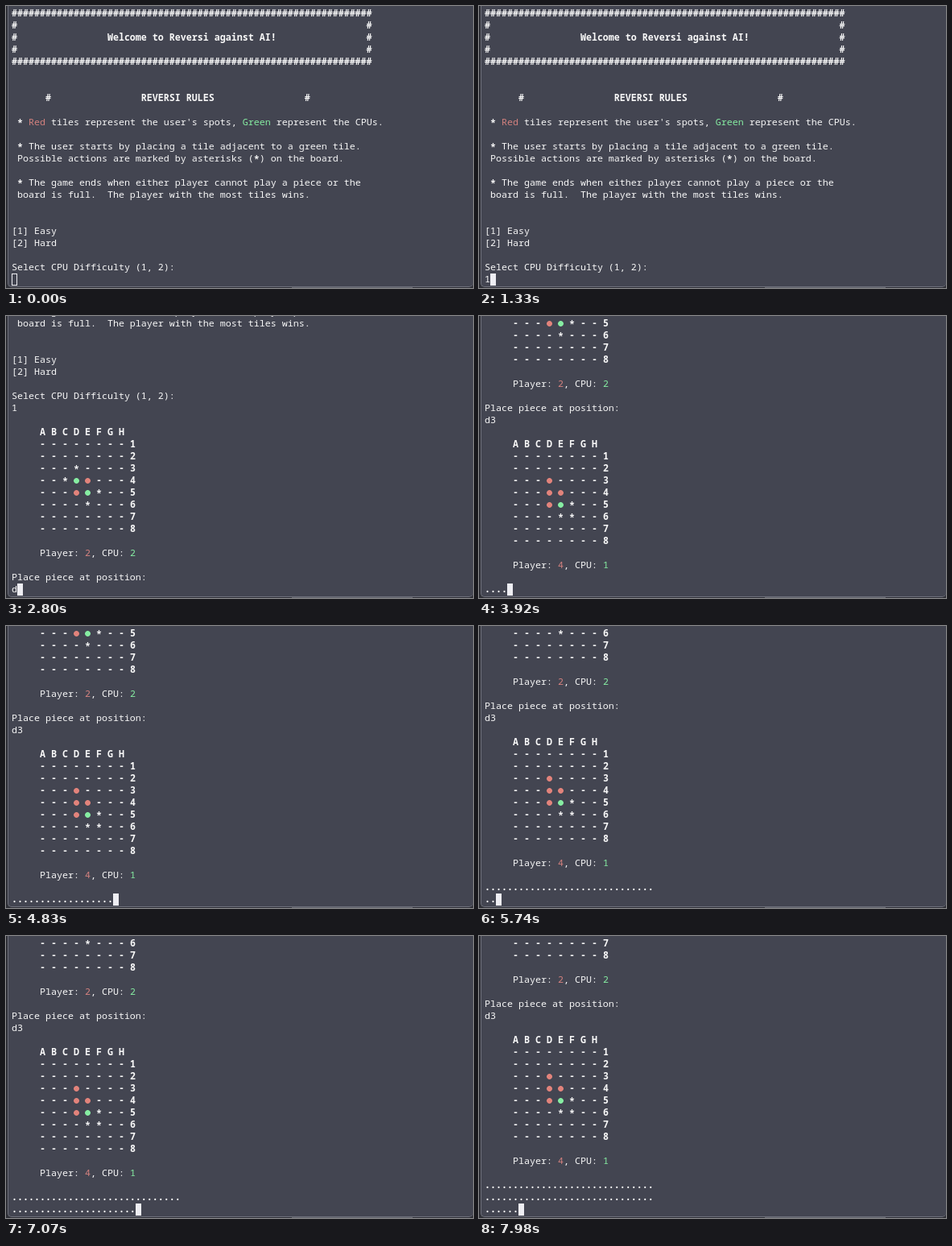
Recreate the animation shown at these times as an HTML page. Size 580 px wide and 350 px high, loop 8000 ms.

```html
<!DOCTYPE html>
<html lang="en">
<head>
<meta charset="utf-8">
<title>Reversi in a terminal</title>
<style>
  html, body { margin: 0; width: 100%; height: 100%; overflow: hidden; background: #2e2f36; }
  #stage { position: relative; width: 580px; height: 350px; overflow: hidden; }
  #window {
    position: absolute; left: 2px; top: -10px; width: 577px; height: 358px;
    background: #434551; border: solid #70727d; border-width: 0 0 1px 1px;
    border-radius: 0 0 5px 5px;
  }
  #shade { position: absolute; left: 355px; top: 349px; width: 150px; height: 1px; background: #62636b; }
  #text {
    position: absolute; left: 7px; bottom: 4px; margin: 0; color: #f8f8f8;
    font: 500 11.667px/15px "Noto Sans Mono", "DejaVu Sans Mono", monospace;
    font-variant-ligatures: none; white-space: pre;
  }
  #text div { height: 15px; }
  b { font-weight: 600; }
  .r { color: #d5827f; }
  .g { color: #86eda2; }
  .disc {
    display: inline-block; width: 7px; height: 15px; vertical-align: top;
    background: radial-gradient(circle at 3.5px 8.5px, currentColor 3px, transparent 3.8px);
  }
  .disc.r { color: #e2837b; }
  .star { position: relative; top: 2px; font-weight: 800; }
  .dots { font-weight: 800; }
  #cursor { position: absolute; top: 332px; width: 7px; height: 15px; box-sizing: border-box; border: 1px solid #eeeef3; }
  #cursor.focused { background: #eeeef3; }
</style>
</head>
<body>
<div id="stage">
  <div id="window"></div>
  <div id="shade"></div>
  <div id="text"></div>
  <div id="cursor"></div>
</div>
<script>
const LOOP = 8000, TICK = 70, CELL = 7, ROWS = 23;
const AT = { focus: 70, one: 1050, start: 1680, d: 2660, three: 3010, move: 3710 };
const DOT_MS = 65.4, DOTS_PER_LINE = 30;

const bold = s => `<b>${s}</b>`;
const span = (name, s) => `<span class="${name}">${s}</span>`;
const red = s => span('r', s);
const green = s => span('g', s);
const dotted = n => span('dots', '.'.repeat(n));

const bar = bold('#'.repeat(64));
const side = bold('#' + ' '.repeat(62) + '#');
const title = 'Welcome to Reversi against AI!';

const intro = [
  bar, side,
  bold('#' + ' '.repeat(16) + title + ' '.repeat(16) + '#'),
  side, bar, '', '',
  bold(' '.repeat(6) + '#' + ' '.repeat(16) + 'REVERSI RULES' + ' '.repeat(16) + '#'),
  '',
  ` * ${red('Red')} tiles represent the user's spots, ${green('Green')} represent the CPUs.`,
  '',
  ' * The user starts by placing a tile adjacent to a green tile.',
  ' Possible actions are marked by asterisks (*) on the board.',
  '',
  ' * The game ends when either player cannot play a piece or the',
  ' board is full.  The player with the most tiles wins.',
  '', '',
  '[1] Easy',
  '[2] Hard',
  '',
  'Select CPU Difficulty (1, 2):'
];

const cell = c => c === 'r' || c === 'g' ? span('disc ' + c, '') : c;

// Ranks 3 to 6 are given; the others are empty.
function board(middle, player, cpu) {
  const empty = '--------';
  const ranks = [empty, empty, ...middle, empty, empty];
  const pad = ' '.repeat(5);
  return [
    '',
    pad + bold('A B C D E F G H'),
    ...ranks.map((rank, i) => pad + bold([...rank].map(cell).join(' ') + ' ' + (i + 1))),
    '',
    `${pad}Player: ${red(player)}, CPU: ${green(cpu)}`,
    ''
  ];
}

const opening = [...intro, '1',
  ...board(['---*----', '--*gr---', '---rg*--', '----*---'], 2, 2),
  'Place piece at position:'];
const thinking = [...opening, 'd3',
  ...board(['---r----', '---rr---', '---rg*--', '----**--'], 4, 1)];

// Returns the lines on screen and the cursor's column in the last one.
function screen(t) {
  if (t < AT.move) {
    const started = t >= AT.start;
    const typed = started
      ? (t < AT.d ? '' : t < AT.three ? 'd' : 'd3')
      : (t < AT.one ? '' : '1');
    return [[...(started ? opening : intro), typed], typed.length];
  }
  const dots = 1 + Math.floor((t - AT.move) / DOT_MS);
  const full = Math.floor(dots / DOTS_PER_LINE);
  const rest = dots % DOTS_PER_LINE;
  return [[...thinking, ...Array(full).fill(dotted(DOTS_PER_LINE)), dotted(rest)], rest];
}

const text = document.getElementById('text');
const cursor = document.getElementById('cursor');
const begin = performance.now();
let shown = -1;

// Asterisks sit at the middle of the line.
const row = s => `<div>${s.replaceAll('*', span('star', '*'))}</div>`;

function draw(now) {
  const t = Math.floor((Math.max(0, now - begin) % LOOP) / TICK) * TICK;
  if (t !== shown) {
    shown = t;
    const [lines, column] = screen(t);
    // One extra line lets descenders show at the top edge.
    text.innerHTML = lines.slice(-ROWS - 1).map(row).join('');
    cursor.style.left = 7 + column * CELL + 'px';
    cursor.className = t < AT.focus ? '' : 'focused';
  }
  requestAnimationFrame(draw);
}
draw(begin);
</script>
</body>
</html>
```
